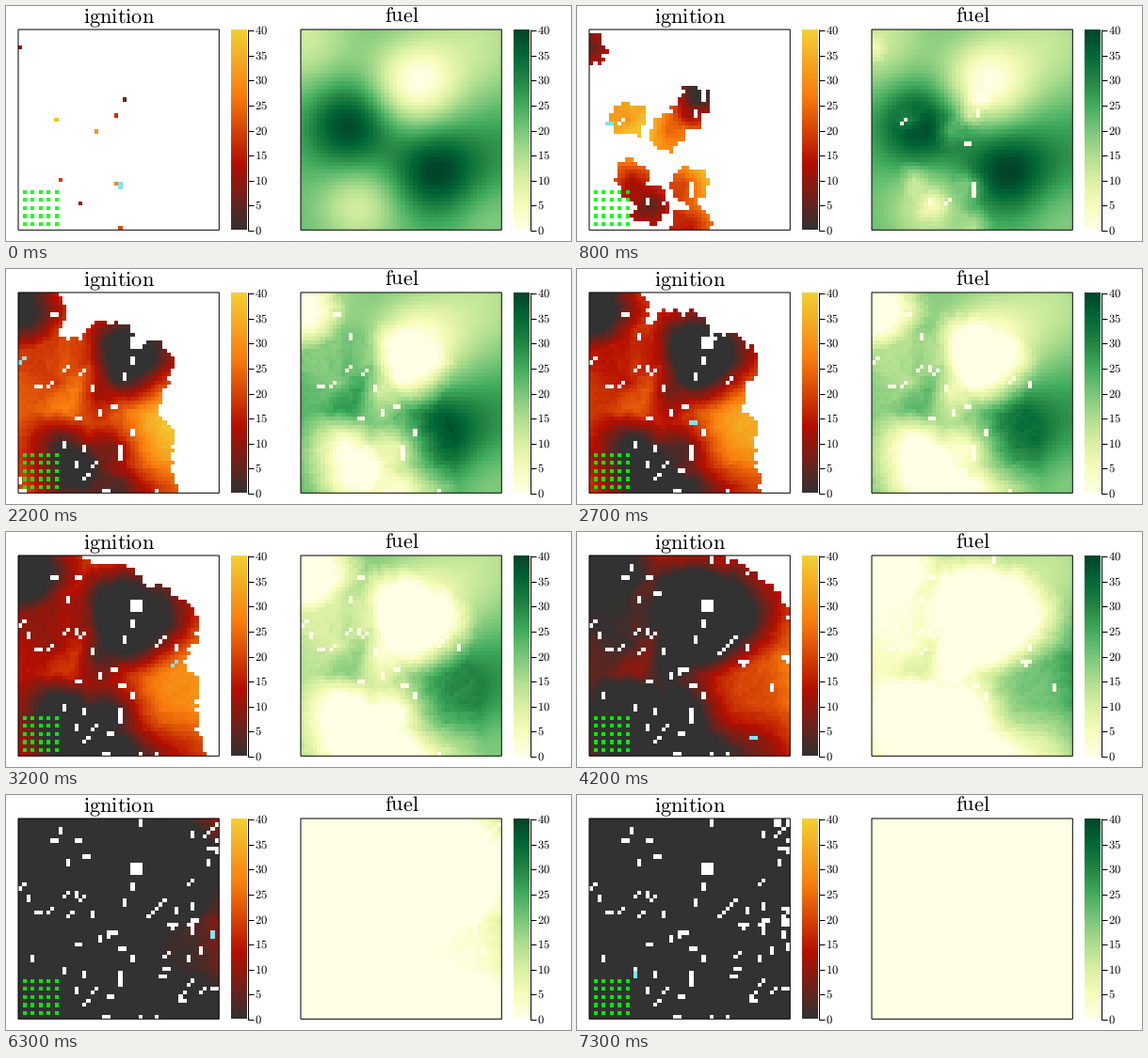
A matplotlib script that plays this animation: 600x250 px, repeating every 7400 ms.

```python
import numpy as np
import matplotlib.pyplot as plt
from matplotlib.animation import FuncAnimation
from matplotlib.colors import LinearSegmentedColormap, to_rgb
from matplotlib.patches import Rectangle

N, FRAMES, STEP = 50, 74, 100
W, H, PT = 600, 250, 0.72          # stage in pixels, points per pixel
TOP, SIZE = 25, 213
VMAX, BURN = 40, 0.9               # full fuel, fuel used per frame

plt.rcParams["mathtext.fontset"] = "cm"
plt.rcParams["text.hinting"] = "none"
FIRE = LinearSegmentedColormap.from_list(
    "fire", ["#323232", "#b50f00", "#f87b0d", "#f2d034"])
LEAF = plt.get_cmap("YlGn")
WATER = to_rgb("#80e4f2")
rng = np.random.default_rng(7)
rows, cols = np.mgrid[0:N, 0:N].astype(float)

# fuel hills and hollows: column, row, height, width
HILLS = [(11.5, 23.5, 18, 7.5), (33, 35, 18, 7.5), (28, 13, -21, 7.5),
         (14, 43.5, -12, 7), (0, 2, -11, 9), (44, 3, -9, 10),
         (49, 30, 5, 9), (47, 46, -4, 7)]

# first burning cells: column, row
SEEDS = [(0, 4), (26, 17), (24, 21), (9, 22), (19, 25),
         (10, 37), (24, 38), (15, 43), (25, 49)]


def fuel_field():
    fuel = np.full((N, N), 22.0)
    for x, y, height, width in HILLS:
        fuel += height * np.exp(-((cols - x) ** 2 + (rows - y) ** 2) / (2 * width ** 2))
    return np.clip(fuel, 0, VMAX)


def arrival_times(fuel):
    """Frame at which the fire reaches each cell; poor cells slow it down."""
    pace = (2.1 - 0.01 * rows) * (1 + 1.5 * np.exp(-fuel / 2))
    pace *= rng.uniform(0.6, 1.4, (N, N))
    pace[fuel < 0.5] = np.inf
    reach = np.full((N, N), np.inf)
    for x, y in SEEDS:
        reach[y, x] = 0
    steps = [(i, j) for i in range(3) for j in range(3) if (i, j) != (1, 1)]
    for _ in range(2 * N):
        wide = np.pad(reach, 1, constant_values=np.inf)
        for i, j in steps:
            near = wide[i:i + N, j:j + N]
            reach = np.minimum(reach, near + pace * np.hypot(i - 1, j - 1))
    return reach


def fuel_left(t):
    return np.maximum(start - BURN * np.maximum(t - lit, 0), 0)


def plan_drops():
    """Each frame, two touching cells in or just ahead of the fire are doused."""
    when = np.full((N, N), FRAMES)
    drops = []
    for t in range(FRAMES):
        left = np.where((lit < t + 3) & (when == FRAMES), fuel_left(t), 0)
        y, x = rng.choice(np.argwhere(left >= min(1, left.max())))
        dy, dx = [(0, 1), (1, 0), (0, 1), (1, 0), (1, -1)][rng.integers(5)]
        pair = [y, min(y + dy, N - 1)], [x, min(x + dx, N - 1)]
        when[pair] = np.minimum(when[pair], t)
        drops.append(pair)
    return drops, when


start = fuel_field()
lit = arrival_times(start)
drops, doused = plan_drops()


def state(t):
    fuel = fuel_left(t)
    fuel[doused < t] = 0
    fire = FIRE(fuel / VMAX)[..., :3]
    fire[(lit > t) | (doused < t)] = 1
    fire[drops[t]] = WATER
    return fire, LEAF(fuel / VMAX)[..., :3]


fig = plt.figure(figsize=(W / 100, H / 100), dpi=100, facecolor="white")
ax = fig.add_axes([0, 0, 1, 1])
ax.axis("off")


def line(xs, ys):
    ax.plot(xs, ys, color="black", lw=0.72, zorder=5, solid_capstyle="butt")


def panel(left, title, cmap, image):
    right, bottom = left + SIZE, TOP + SIZE
    img = ax.imshow(image, extent=(left, right, bottom, TOP),
                    interpolation="nearest", zorder=1)
    ax.add_patch(Rectangle((left, TOP), SIZE + 0.3, SIZE + 0.3, fill=False,
                           ec="black", lw=0.72, zorder=5, snap=False))
    ax.text(left + SIZE / 2 + 0.5, 18, rf"$\mathrm{{{title}}}$",
            fontsize=22.4 * PT, ha="center", va="baseline")

    bar = left + 226
    ramp = np.linspace(1, 0, 256)[:, None]
    ax.imshow(cmap(ramp)[..., :3], extent=(bar, bar + 17, bottom, TOP),
              interpolation="nearest", zorder=1)
    axis = bar + 17.5
    line([axis, axis], [TOP, bottom + 1])
    for v in range(0, VMAX + 1, 5):
        y = round(bottom - v / VMAX * SIZE) + 0.5
        line([axis, axis + 6], [y, y])
        ax.text(axis + 7.5, y + 4, rf"$\mathrm{{{v}}}$", fontsize=12.6 * PT,
                ha="left", va="baseline")
    return img


fire0, fuel0 = state(0)
fire_img = panel(13, "ignition", FIRE, fire0)
fuel_img = panel(313, "fuel", LEAF, fuel0)

# protected block of cells
cell = SIZE / N
for c in range(1, 10, 2):
    for r in range(40, 49, 2):
        ax.add_patch(Rectangle((13 + c * cell + 0.3, TOP + r * cell + 0.3), cell, cell,
                               fc="#00ff00", ec="none", alpha=0.9, zorder=3))

ax.set_xlim(0, W)
ax.set_ylim(H, 0)
ax.set_aspect("auto")


def update(t):
    fire, fuel = state(t)
    fire_img.set_data(fire)
    fuel_img.set_data(fuel)
    return fire_img, fuel_img


anim = FuncAnimation(fig, update, frames=FRAMES, interval=STEP, repeat=True,
                     repeat_delay=0, init_func=lambda: update(0))
plt.show()
```
